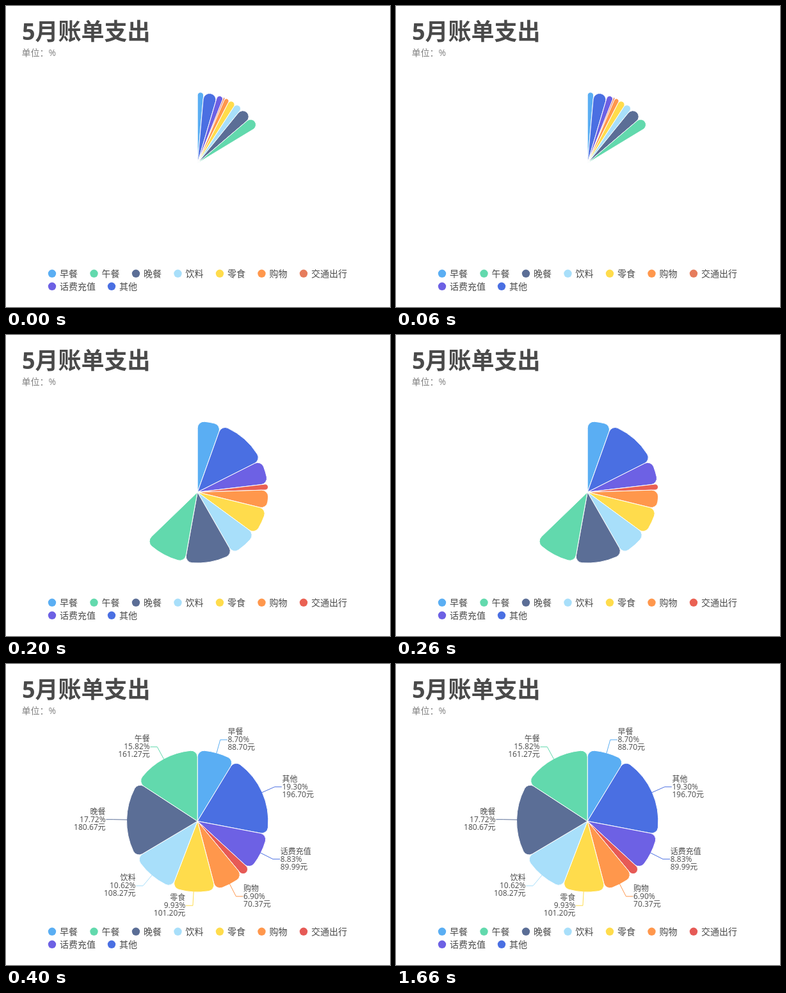
Recreate the animation shown at these times as an HTML page. Size 600 by 470 pixels, loop 2500 ms.

```html
<!DOCTYPE html>
<html lang="zh-CN">
<head>
<meta charset="utf-8">
<style>
html, body { margin: 0; width: 100%; height: 100%; overflow: hidden; background: #fff; }
svg { display: block; width: 600px; height: 470px; font-family: "Open Sans", "Noto Sans CJK SC", "Noto Sans CJK", sans-serif; }
.title { font-size: 36px; font-weight: 700; fill: #4a4a4a; }
.unit { font-size: 14px; fill: #808080; }
.legend { font-size: 14px; fill: #4a4a4a; }
.label { font-size: 12px; fill: #4a4a4a; }
.slice { stroke: #fff; stroke-width: 1; stroke-linejoin: bevel; }
.leader { fill: none; stroke-width: 1; }
</style>
</head>
<body>
<svg id="chart" viewBox="0 0 600 470">
  <text class="title" x="25" y="53">5月账单支出</text>
  <text class="unit" x="24.4" y="78">单位：%</text>
</svg>
<script>
const LOOP = 2500, STEP = 100;
const CX = 299.2, CY = 245.4, R = 110.7, CORNER = 10;

// Total sweep in degrees and the tint of the red item at each step
const sweeps = [58.8, 138.3, 226, 330.3, 360];
const reds = ['#e67c5c', '#e6705a', '#ea6153', '#e65a56', '#e65a56'];

// Clockwise from the top: name, percent, amount, colour
const items = [
  ['早餐', 8.70, '88.70', '#5aaef3'],
  ['其他', 19.30, '196.70', '#4a6fe2'],
  ['话费充值', 8.83, '89.99', '#6d61e4'],
  ['交通出行', 2.18, '', '#e65a56'],
  ['购物', 6.90, '70.37', '#ff974c'],
  ['零食', 9.93, '101.20', '#ffdc4c'],
  ['饮料', 10.62, '108.27', '#a8dffa'],
  ['晚餐', 17.72, '180.67', '#5b6e96'],
  ['午餐', 15.82, '161.27', '#62d9ad']
].map(([name, share, sum, color]) => ({ name, share, sum, color }));
const legendOrder = [0, 8, 7, 6, 5, 4, 3, 2, 1];

const svg = document.getElementById('chart');

function add(tag, attrs, parent = svg, text = '') {
  const el = document.createElementNS(svg.namespaceURI, tag);
  for (const key in attrs) el.setAttribute(key, attrs[key]);
  el.textContent = text;
  return parent.appendChild(el);
}

const polar = (r, a) => [CX + r * Math.sin(a), CY - r * Math.cos(a)];
const at = (r, a) => polar(r, a).map(v => v.toFixed(3)).join(' ');

// Sector with rounded outer corners, limited to its inscribed circle
function sector(a0, a1) {
  const half = Math.sin((a1 - a0) / 2);
  const c = Math.min(CORNER, R * half / (1 + half));
  const side = Math.sqrt((R - c) ** 2 - c * c);
  const turn = Math.min(Math.asin(c / (R - c)), (a1 - a0) / 2);
  return `M${CX} ${CY}L${at(side, a0)}A${c} ${c} 0 0 1 ${at(R, a0 + turn)}` +
    `A${R} ${R} 0 0 1 ${at(R, a1 - turn)}A${c} ${c} 0 0 1 ${at(side, a1)}Z`;
}

const slices = items.map(d => add('path', { class: 'slice', fill: d.color }));

const dots = [];
legendOrder.forEach((n, i) => {
  const x = i < 7 ? 72 + i * 65.5 : 72 + (i - 7) * 93;
  const y = i < 7 ? 418 : 438;
  dots[n] = add('circle', { cx: x, cy: y - 0.2, r: 6.2, fill: items[n].color });
  add('text', { class: 'legend', x: x + 12, y: y + 5 }, svg, items[n].name);
});

const labels = add('g', {});
let before = 0;
items.forEach((d, i) => {
  const mid = (before + d.share / 2) / 50 * Math.PI;
  before += d.share;
  if (!d.sum) return;
  const dir = mid < Math.PI ? 1 : -1;
  const [x, y] = polar(132, mid);
  const end = x + dir * 11;
  add('path', {
    class: 'leader',
    stroke: d.name === '话费充值' ? '#4a6fe2' : d.color,
    d: `M${at(R - 0.5, mid)}L${x} ${y}H${end}`
  }, labels);
  [d.name, d.share.toFixed(2) + '%', d.sum + '元'].forEach((line, row) => add('text', {
    class: 'label',
    x: end + dir * 0.6,
    y: Math.round(y) + 4 + (row - 1) * 12,
    'text-anchor': dir > 0 ? 'start' : 'end'
  }, labels, line));
});

let shown = -1;

function draw(step) {
  const scale = sweeps[step] / 100 * Math.PI / 180;
  let a = 0;
  items.forEach((d, i) => {
    const next = a + d.share * scale;
    slices[i].setAttribute('d', sector(a, next));
    a = next;
  });
  slices[3].setAttribute('fill', reds[step]);
  dots[3].setAttribute('fill', reds[step]);
  labels.setAttribute('visibility', step === 4 ? 'visible' : 'hidden');
}

function tick() {
  const step = Math.min(4, Math.floor(performance.now() % LOOP / STEP));
  if (step !== shown) draw(shown = step);
  requestAnimationFrame(tick);
}
tick();
</script>
</body>
</html>
```
